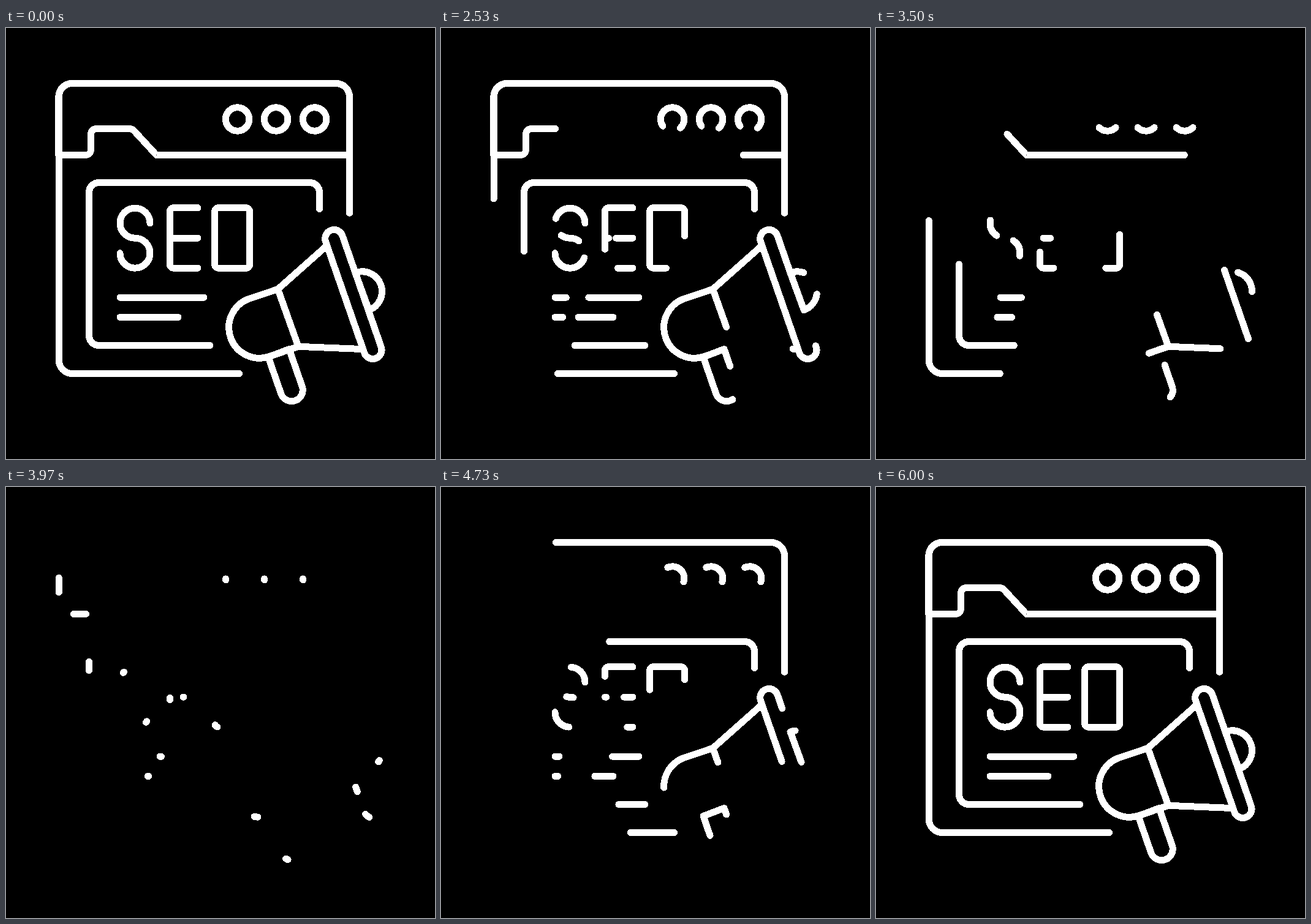
An HTML page that plays this animation: 700x704 px, repeating every 8010 ms.

```html
<!DOCTYPE html>
<html lang="en">
<head>
<meta charset="utf-8">
<title>SEO line icon</title>
<style>
  html, body {
    margin: 0;
    width: 100%;
    height: 100%;
    overflow: hidden;
    background: #000;
  }

  svg {
    display: block;
    width: 100%;
    height: 100%;
    fill: none;
    stroke: #fff;
    stroke-width: 11;
    stroke-linecap: round;
    stroke-linejoin: round;
    shape-rendering: crispEdges;
    animation: blank 8010ms step-end -4ms infinite;
  }

  /* Every path is one unit long: 2 s rest, 2 s erase, 2 s redraw, rest. */
  path {
    stroke-dasharray: 1 0;
    animation: trim 8010ms linear -4ms infinite;
  }

  @keyframes trim {
    0% { stroke-dasharray: 1 0; stroke-dashoffset: -1; }
    24.9688% {
      stroke-dasharray: 1 0;
      stroke-dashoffset: -1;
      animation-timing-function: steps(60);
    }
    49.9375% { stroke-dasharray: 0 1; stroke-dashoffset: -.5; }
    49.9376% {
      stroke-dasharray: 0 1;
      stroke-dashoffset: -1.5;
      animation-timing-function: steps(60);
    }
    74.9064%, 100% { stroke-dasharray: 1 0; stroke-dashoffset: 0; }
  }

  /* Zero-length dashes would still show their caps. */
  @keyframes blank {
    0% { opacity: 1; }
    49.9376% { opacity: 0; }
    50.3537%, 100% { opacity: 1; }
  }
</style>
</head>
<body>
<svg viewBox="0 0 700 704" role="img" aria-label="SEO page with a megaphone">
  <g id="window">
    <path pathLength="1" d="M560.5 302.300V112.500a22 22 0 0 0-22-22H108.300a22 22 0 0 0-22 22V542.500a22 22 0 0 0 22 22H380.500"/>
    <path pathLength="1" d="M560.5 112.500a22 22 0 0 0-22-22H107.800a22 22 0 0 0-22 22V207.500H129.500a9 9 0 0 0 9-9V173.500a9 9 0 0 1 9-9H201q5 0 8 3.500L245.500 207.500H560.500Z"/>
    <path pathLength="1" d="M511.5 295.500V268.500a16 16 0 0 0-16-16H151.500a16 16 0 0 0-16 16V502.500a16 16 0 0 0 16 16H333"/>
  </g>
  <g id="buttons">
    <path pathLength="1" d="M396.800 149a19.200 19.200 0 1 0-38.400 0a19.200 19.200 0 1 0 38.400 0"/>
    <path pathLength="1" d="M459.800 149a19.200 19.200 0 1 0-38.400 0a19.200 19.200 0 1 0 38.400 0"/>
    <path pathLength="1" d="M522.800 149a19.200 19.200 0 1 0-38.400 0a19.200 19.200 0 1 0 38.400 0"/>
  </g>
  <g id="letters">
    <path pathLength="1" d="M235 318.700a24.500 24.500 0 1 0-24.500 24.500"/>
    <path pathLength="1" d="M186 367.700a24.500 24.500 0 1 0 24.500-24.500"/>
    <path pathLength="1" d="M313 293.700H273.500a6 6 0 0 0-6 6V386.200a6 6 0 0 0 6 6H313"/>
    <path pathLength="1" d="M313 343.200H267.500"/>
    <path pathLength="1" d="M397.600 299.700a6 6 0 0 0-6-6H346.600a6 6 0 0 0-6 6V386.200a6 6 0 0 0 6 6H391.600a6 6 0 0 0 6-6Z"/>
    <path pathLength="1" d="M323 440.200H186"/>
    <path pathLength="1" d="M281 472.400H186"/>
  </g>
  <g id="megaphone">
    <path pathLength="1" d="M548.900 339.200A14.500 14.500 0 0 0 521.500 348.800L584.800 530.800A14.500 14.500 0 0 0 612.200 521.200Z"/>
    <path pathLength="1" d="M443.600 426.600L523.800 355.300L582.600 524.600L477 520.300Z"/>
    <path pathLength="1" d="M443.600 426.600L394.600 443A50 50 0 0 0 428.400 537L477 520.300Z"/>
    <path pathLength="1" d="M462 524.500L428 537.500L448.800 597.400A18.200 18.200 0 0 0 483.200 585.400Z"/>
    <path pathLength="1" d="M570 399.800L592.200 460.800A32.400 32.400 0 0 0 570 399.800Z"/>
  </g>
</svg>
</body>
</html>
```
